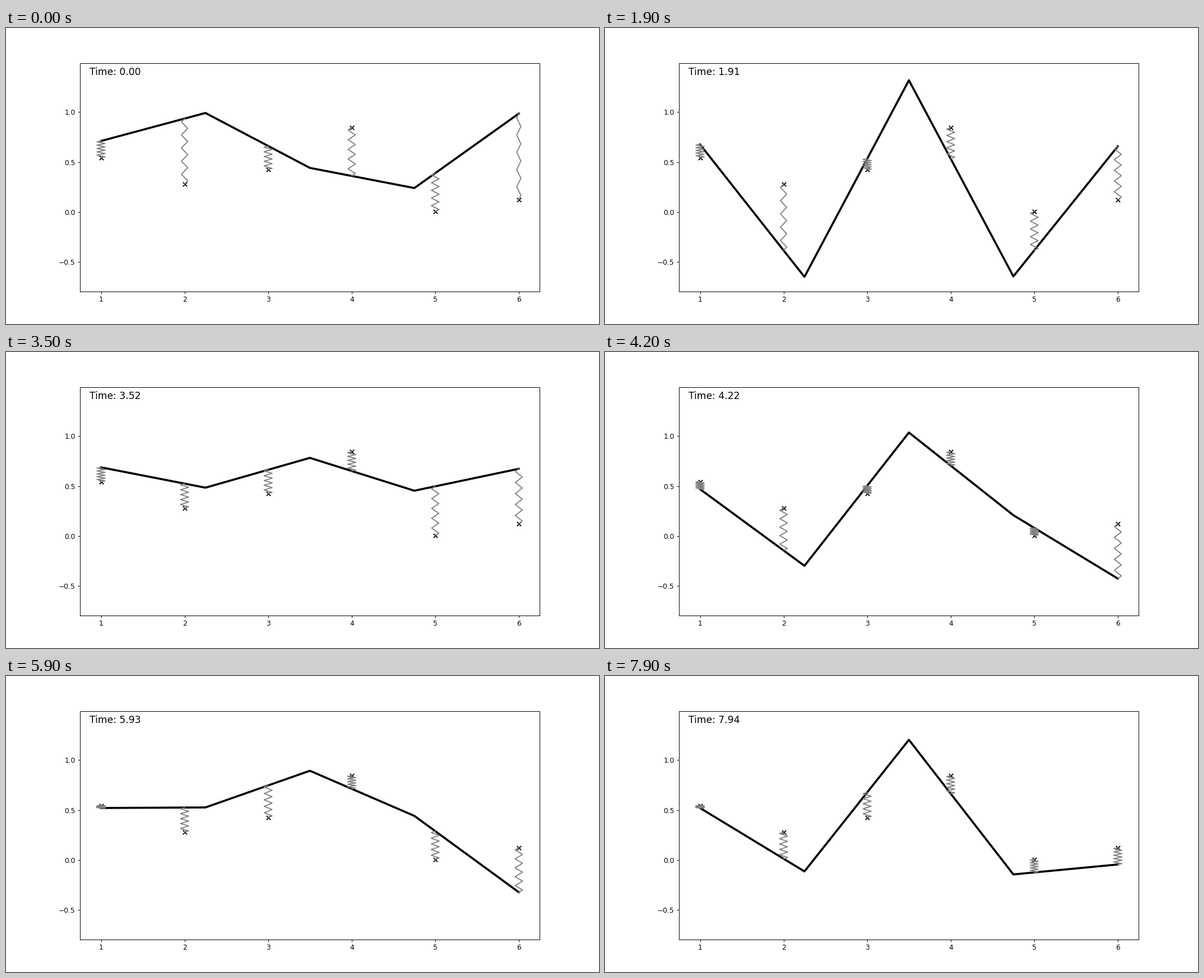
Write a matplotlib script that moves like this. It is 1058 by 529 pixels and loops after 8 s.

```python
import numpy as np
import matplotlib.pyplot as plt
from matplotlib.animation import FuncAnimation

FRAMES, INTERVAL = 80, 100
STEP = 20 / 199          # simulated seconds per frame
DAMPING = 0.25

# Anchors pulled towards by unit springs
np.random.seed(100)
xs = np.arange(1, 7)
ys = np.random.rand(6)

# Jointed rod: piecewise linear, total mass 1 spread evenly
knots = np.linspace(1, 6, 5)
start_pos = np.array([0.711, 0.992, 0.441, 0.239, 0.986])
start_vel = np.array([0.626, 0.349, 0.723, 0.837, 0.716])

basis = np.array([np.interp(xs, knots, row) for row in np.eye(5)]).T
stiff = basis.T @ basis
mass = (np.diag([2, 4, 4, 4, 2]) + np.eye(5, k=1) + np.eye(5, k=-1)) / 24
rest = np.linalg.solve(stiff, basis.T @ ys)

# Normal modes of the damped system
eigs, modes = np.linalg.eig(np.linalg.solve(mass, stiff))
decay = DAMPING / 2
omega = np.sqrt(eigs - decay**2)
amp_cos = np.linalg.solve(modes, start_pos - rest)
amp_sin = (np.linalg.solve(modes, start_vel) + decay * amp_cos) / omega


def heights(t):
    swing = amp_cos * np.cos(omega * t) + amp_sin * np.sin(omega * t)
    return rest + modes @ (np.exp(-decay * t) * swing)


def spring(x, y0, y1, nodes=10, width=0.1):
    """Zigzag of constant wire length from (x, y0) to (x, y1)."""
    length = y1 - y0
    i = np.arange(1, nodes + 1)
    side = np.sqrt(max(0, width**2 - (length / nodes)**2)) / 2
    zig = x - np.sign(length) * side * (-1.0)**i
    rise = y0 + length * (2 * i - 1) / (2 * nodes)
    return np.r_[x, zig, x], np.r_[y0, rise, y1]


fig, ax = plt.subplots(figsize=(12, 6), dpi=1058 / 12)
ax.set_xlim(0.75, 6.25)
ax.set_ylim(-0.798, 1.488)
ax.set_yticks([-0.5, 0, 0.5, 1])

ax.scatter(xs, ys, marker="x", color="black")
rod, = ax.plot([], [], color="black", lw=3)
coils = [ax.plot([], [], color="gray", lw=1.5)[0] for _ in xs]
clock = ax.text(0.02, 0.95, "", transform=ax.transAxes, fontsize=14)


def draw(frame):
    t = frame * STEP
    h = heights(t)
    rod.set_data(knots, h)
    for coil, x, y, end in zip(coils, xs, ys, basis @ h):
        coil.set_data(*spring(x, y, end))
    clock.set_text(f"Time: {t:.2f}")
    return [rod, clock, *coils]


anim = FuncAnimation(fig, draw, frames=FRAMES, interval=INTERVAL,
                     repeat=True, repeat_delay=0)
plt.show()
```
